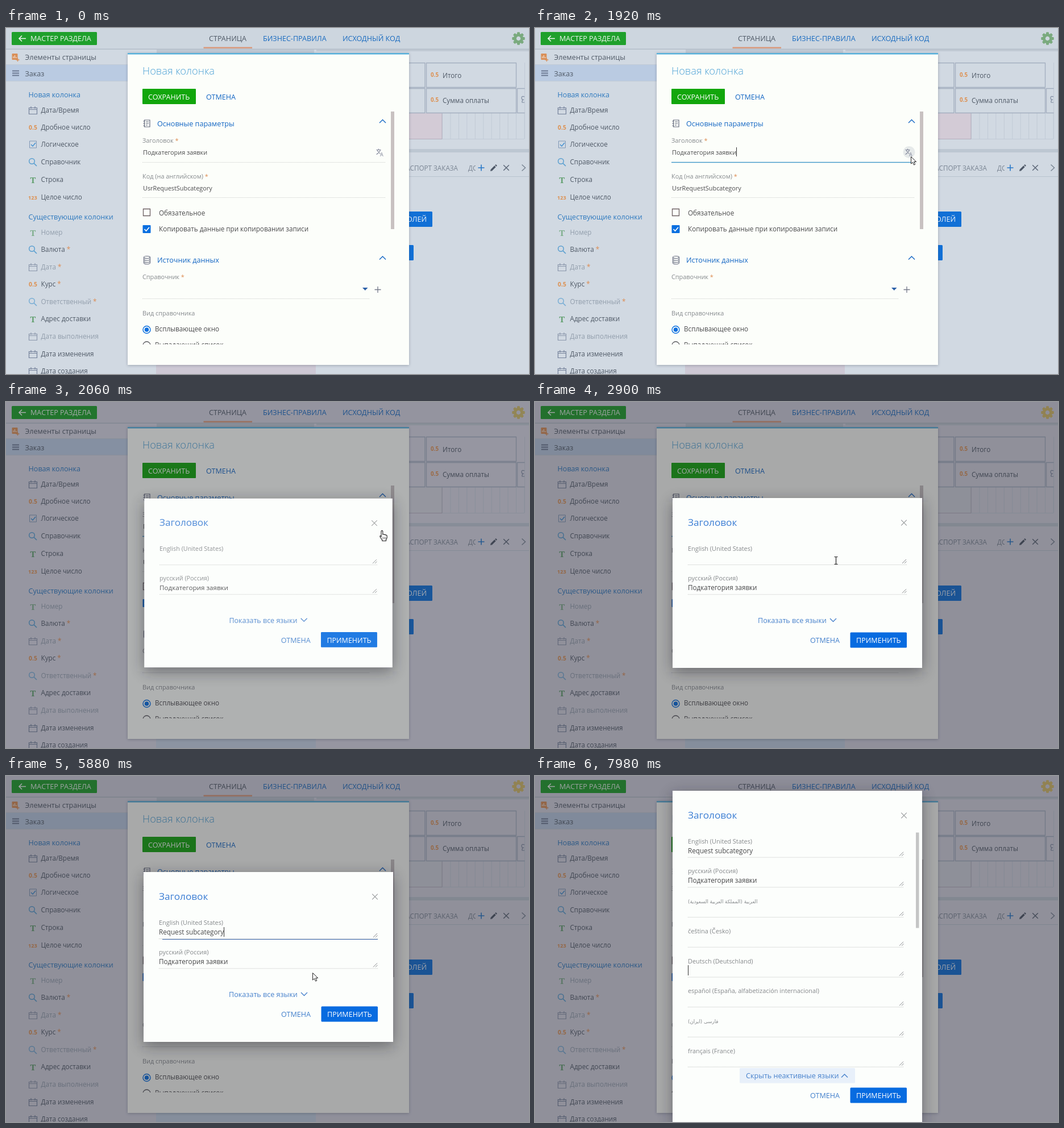
Animation, 920 px wide and 609 px high, one loop 8000 ms. Source, as an HTML page:

```html
<!DOCTYPE html>
<html lang="ru">
<head>
<meta charset="utf-8">
<title>Новая колонка</title>
<style>
html, body { margin: 0; width: 100%; height: 100%; overflow: hidden; background: #d0d8e1; }
svg { display: block; width: 920px; height: 609px; font-family: "Open Sans", "Noto Sans", sans-serif; }
text { white-space: pre; }
</style>
</head>
<body>
<svg id="stage" viewBox="0 0 920 609" xmlns="http://www.w3.org/2000/svg"></svg>
<script>
const LOOP = 8000;
const S = 10.88, M = 11.7, L = 12.6; // type sizes

const rect = (x, y, w, h, fill, more = '') =>
  `<rect x="${x}" y="${y}" width="${w}" height="${h}" fill="${fill}" ${more}/>`;
const line = (d, color, w = 1, more = '') =>
  `<path d="${d}" fill="none" stroke="${color}" stroke-width="${w}" ${more}/>`;
const text = (x, y, size, str, fill, more = '') =>
  `<text x="${x}" y="${y}" font-size="${size}" fill="${fill}" ${more}>${str}</text>`;
const star = '<tspan fill="#dd8c52"> *</tspan>';
const dots = 'stroke-dasharray="1 1"';
const chevron = (x, y, color, up) =>
  line(up ? `M${x - 5.5} ${y + 3}l5.5 -5.5 5.5 5.5` : `M${x - 5.5} ${y - 3}l5.5 5.5 5.5 -5.5`, color, 1.4);
const cross = (x, y, r, color, w) =>
  line(`M${x - r} ${y - r}l${2 * r} ${2 * r}M${x + r} ${y - r}l${-2 * r} ${2 * r}`, color, w);
const plus = (x, y, r, color, w) =>
  line(`M${x - r} ${y}h${2 * r}M${x} ${y - r}v${2 * r}`, color, w);

const icons = {
  date: y => line(`M40.5 ${y - 4.5}h14v11h-14zM40.5 ${y - 1.5}h14M44 ${y - 7}v4M51 ${y - 7}v4`, '#74819a', 1.2),
  num: y => text(40, y + 4, 10.4, '0.5', '#dd9050', 'font-weight="700"'),
  bool: y => line(`M41.5 ${y - 6}h12v12h-12z`, '#7f97b5') + line(`M44 ${y}l3 3 5 -6`, '#3f8fd0', 1.4),
  ref: y => `<circle cx="45.5" cy="${y - 1.5}" r="4.8" fill="none" stroke="#5a9fd0" stroke-width="1.5"/>` +
    line(`M49 ${y + 2}l5 5`, '#5a9fd0', 1.7),
  str: y => text(47.5, y + 5.5, 15, 'T', '#63a070', 'text-anchor="middle" font-weight="600" style="font-family:\'Noto Serif\',serif"'),
  int: y => text(39, y + 3.5, 9.2, '123', '#dd9050', 'font-weight="700"')
};

const fields = [
  [145, 'date', 'Дата/Время'], [175, 'num', 'Дробное число'], [205, 'bool', 'Логическое'],
  [236, 'ref', 'Справочник'], [267, 'str', 'Строка'], [298, 'int', 'Целое число'],
  [360, 'str', 'Номер', 0, 1], [390, 'ref', 'Валюта', 1], [421, 'date', 'Дата', 1, 1],
  [451, 'num', 'Курс', 1], [482, 'ref', 'Ответственный', 1, 1], [512, 'str', 'Адрес доставки'],
  [543, 'date', 'Дата выполнения', 0, 1], [574, 'date', 'Дата изменения'], [604, 'date', 'Дата создания']
];

function gear() {
  let teeth = '';
  for (let i = 0; i < 8; i++) teeth += `<rect x="-2.4" y="-11.2" width="4.8" height="5" rx="1" transform="rotate(${i * 45})" stroke="none"/>`;
  return `<g id="gear" transform="translate(901.5 18.5)">${teeth}<circle r="6.2" fill="none" stroke-width="5"/></g>`;
}

function page() {
  const ink = '#505a67', blue = '#1b6cc0', edge = '#a3aebf';
  let s = rect(0, 0, 920, 609, '#d1d9e2', 'id="ground"') + rect(0, 0, 920, 37, '#cdd6df', 'id="header"') +
    rect(0, 36.5, 920, 1.5, '#b4bec9') +
    rect(265, 38, 277, 6, '#bfc8d3') + rect(546, 38, 374, 3, '#c0c9d3') +
    rect(264, 44, 281, 565, '#cdc8d4', 'id="canvas"') +
    rect(10, 7, 150, 23, '#1fa02c', 'rx="1.5"') +
    line('M35 18.5H23.5M28 13.5l-5 5 5 5', '#eef6f0', 1.6) +
    text(43, 23, L, 'МАСТЕР РАЗДЕЛА', '#eef6f0') +
    text(357, 23, L, 'СТРАНИЦА', ink) + text(452, 23, L, 'БИЗНЕС-ПРАВИЛА', blue) +
    text(592, 23, L, 'ИСХОДНЫЙ КОД', blue) + rect(347.5, 33.5, 85.5, 2.5, '#d99a7c') + gear();

  s += rect(0, 65, 264, 28.5, '#bacbe2') + line('M0 64.5H264M0 93.5H264', '#c0cad6') +
    rect(10.5, 45, 10, 11, '#d98f58', 'rx="1"') +
    line('M13 53v-3M15.5 53v-5M18 53v-2', '#f0e4da', 1.2) + plus(20.5, 56, 3, '#d98f58', 1.4) +
    line('M11 75.5h12M11 79.5h12M11 83.5h12', '#6d7b93', 2.2) +
    text(33.5, 56, L, 'Элементы страницы', ink) + text(33.5, 84.5, L, 'Заказ', ink) +
    text(39.5, 122, L, 'Новая колонка', '#2f7abf') + text(39.5, 337, L, 'Существующие колонки', '#2f7abf');
  for (const [y, icon, label, must, off] of fields) {
    s += `<g${off ? ' opacity=".75"' : ''}>${icons[icon](y)}</g>` +
      text(61.5, y + 4.3, M, label + (must ? star : ''), off ? '#929eac' : ink);
  }

  let grid = '';
  for (let i = 0; i < 11; i++) grid += `M${767.5 + i * 14.45} 150v45`;
  s += line(grid, '#c1cad6') + line('M767 195.5H912M912.5 61v134', '#c1cad6') +
    rect(700, 150, 67, 45, '#d3cbd6', 'id="slot"') + line('M700 195.5h67v-45', '#b3aebd') +
    line('M700 61.5h37v43h-37M739.5 61.5h158v43h-158zM700 106.5h37v43h-37M739.5 106.5h158v43h-158zM912.5 106.5h-13v43h13', edge, 1.3) +
    text(747, 85.5, 9.8, '0.5', '#dd9050', 'font-weight="700"') + text(768, 88, M, 'Итого', ink) +
    text(747, 129.5, 9.8, '0.5', '#dd9050', 'font-weight="700"') + text(768, 132, M, 'Сумма оплаты', ink) +
    line('M912 121q-5 -2 -5 2t4 3q-4 1 -3 5h4', '#7f8ba0', 1.2) +
    rect(546, 213, 374, 6, '#bdc7d2') + line('M546 261.5H920', '#b9c3cf') +
    text(795, 250.5, M, 'ПАСПОРТ ЗАКАЗА', '#7b8694', 'text-anchor="end"') +
    text(813, 250.5, M, 'ДС', '#7b8694', 'clip-path="url(#tabClip)"') +
    plus(836, 246, 5.5, '#2878c8', 1.6) + cross(880, 246, 4.8, '#5d6878', 1.5) +
    line('M854 250l6.5 -6.5', '#4c5665', 3.2) + line('M861.3 242.7l1.5 -1.5', '#4c5665', 3.2) +
    `<path d="M852 252l.8 -3.5 2.7 2.7z" fill="#4c5665"/>` +
    line('M907.5 240.5l6 5.5 -6 5.5', '#7b8694', 1.5) +
    rect(640, 323, 110, 27, '#1170d6', 'rx="1.5"') +
    text(740, 341, L, 'ПОЛЕЙ', '#eef3f9', 'text-anchor="end"') + rect(640, 382, 77, 27, '#1170d6', 'rx="1.5"');
  return s;
}

function modal() {
  const blue = '#1467c4', ink = '#4c4c4e', soft = '#868a8e';
  return rect(214, 45, 495, 549, '#3a4252', 'opacity=".35" filter="url(#soft)"') +
    rect(214, 44, 495, 549, '#fcfefa') + rect(214, 44, 495, 2.5, '#58b0da') +
    text(240, 82, 18.3, 'Новая колонка', '#4fa3d6', 'font-weight="300"') +
    rect(240, 107, 94, 27, '#12a60c', 'rx="1"') + text(250, 126, L, 'СОХРАНИТЬ', '#fff') +
    text(352, 126, L, 'ОТМЕНА', blue) +
    line('M243.5 162h9.5v12h-9.5zM241.5 164h3M241.5 168h3M241.5 172h3M246 165h5M246 168h5M246 171h3', '#62687c', 1.2) +
    text(266, 172.5, L, 'Основные параметры', blue) + chevron(662.5, 164, blue, true) +
    text(240, 201.5, S, 'Заголовок' + star, soft) + text(241, 222.5, S, 'Подкатегория заявки', ink) +
    '<circle id="hover" cx="658" cy="218.5" r="10.5" fill="#e6eaea"/>' +
    line('M651.5 214.5h8M655.5 212.5v2M658.5 214.5q-1.5 5 -7 8M653 215q2 4.5 5.5 6.5', '#82879a', 1.1) +
    text(658, 225.5, 9, 'A', '#82879a') +
    line('M240 236.5H668M240 298.5H668', '#cbcdcb', 1, dots) +
    `<g id="focus1">${rect(240, 235.8, 428, 1.4, '#3f97c8')}${rect(354, 210, 1, 16, '#333')}</g>` +
    text(240, 264.5, S, 'Код (на английском)' + star, soft) + text(241, 285.5, S, 'UsrRequestSubcategory', ink) +
    line('M241.5 318.5h12v12h-12z', '#6d6064', 1.3) + text(269, 329.5, M, 'Обязательное', ink) +
    rect(240.5, 347, 14, 14, '#0a6fe0', 'rx="1"') + line('M243.5 354l3 3.2 5.5 -6.5', '#fff', 1.6) +
    text(269, 358.3, M, 'Копировать данные при копировании записи', ink) +
    line('M242.5 403.5a5.5 2 0 0 0 11 0a5.5 2 0 0 0 -11 0v10a5.5 2 0 0 0 11 0v-10M242.5 407a5.5 2 0 0 0 11 0M242.5 410.5a5.5 2 0 0 0 11 0', '#62687c', 1.1) +
    text(266, 413, L, 'Источник данных', blue) + chevron(662.5, 404.5, blue, true) +
    text(240, 441.5, S, 'Справочник' + star, soft) + line('M240 476.5H640', '#cbcdcb', 1, dots) +
    '<path d="M627 457h9.5l-4.75 5z" fill="#2b60a8"/>' + plus(654, 460.5, 5.5, '#74798a', 1.3) +
    text(240, 506, S, 'Вид справочника', soft) +
    '<circle cx="247.5" cy="531" r="6.5" fill="none" stroke="#0a6fe0" stroke-width="1.4"/><circle cx="247.5" cy="531" r="3.8" fill="#0a6fe0"/>' +
    text(262, 534.3, M, 'Всплывающее окно', ink) +
    `<g clip-path="url(#bodyClip)"><circle cx="247.5" cy="558.5" r="6.5" fill="none" stroke="#5b5b60" stroke-width="1.3"/>` +
    text(262, 562, M, 'Выпадающий список', ink) + '</g>' +
    rect(677, 147, 6, 207, '#c8c1c1');
}

// One language field; y is the label baseline
function row(y, label, value, right, rtl) {
  return text(269, y, rtl ? 8.7 : S, label, '#85888b', rtl ? 'style="font-family:\'DejaVu Sans\',sans-serif"' : '') +
    text(269, y + 17, M, value, '#48484a') +
    line(`M269 ${y + 24.5}H${right}`, '#c2c4c2', 1, dots) +
    line(`M${right - 8} ${y + 22}l7 -7M${right - 4} ${y + 22}l3.5 -3.5`, '#85888b', 1);
}

function frame(dy, button) {
  return rect(242, 169 - dy, 439, 299 + 2 * dy, '#1c1e28', 'opacity=".45" filter="url(#deep)" transform="translate(0 7)"') +
    rect(242, 169 - dy, 439, 299 + 2 * dy, '#fcfefc') +
    `<g class="ink">` + text(269, 217.5 - dy, 17.2, 'Заголовок', '#3a7dd4') +
    cross(649, 212.5 - dy, 4.8, '#96999a', 1.1) +
    button +
    text(484, 424.3 + dy, L, 'ОТМЕНА', '#4380cc') +
    rect(554.5, 405.5 + dy, 99.5, 27, '#076be0', 'rx="1.5"') +
    text(565, 424.3 + dy, L, 'ПРИМЕНИТЬ', '#fff') + '</g>';
}

function smallDialog() {
  return frame(0, rect(383, 371, 159, 26.5, '#e8f0fa', 'id="linkHover" rx="1.5"') +
    text(392, 389, L, 'Показать все языки', '#4882cc') + chevron(524.5, 384, '#4882cc', false)) +
    '<g class="ink">' + row(262, 'English (United States)', '<tspan id="typed"></tspan>', 654) +
    row(314.3, 'русский (Россия)', 'Подкатегория заявки', 654) + '</g>' +
    rect(275, 287, 379, 1, '#3c68ac', 'id="focus2"') + rect(269, 266, 1, 17, '#333', 'id="caret2"');
}

function bigDialog() {
  const langs = ['English (United States)', 'русский (Россия)', 'العربية (المملكة العربية السعودية)', 'čeština (Česko)',
    'Deutsch (Deutschland)', 'español (España, alfabetización internacional)', 'فارسى (ايران)', 'français (France)'];
  const values = ['Request subcategory', 'Подкатегория заявки'];
  return frame(143, rect(360, 514, 203, 26.5, '#e8f0fa', 'rx="1.5"') +
    text(371, 532, L, 'Скрыть неактивные языки', '#4882cc') + chevron(544.5, 527.5, '#4882cc', true)) +
    langs.map((name, i) => row(118.7 + i * 52.7, name, values[i] || '', 649, i === 2 || i === 6)).join('') +
    rect(670, 99.5, 5.5, 168, '#c4c5c5') + rect(269, 333, 1, 18, '#333', 'id="caret3"');
}

const pointers = {
  arrow: '<path d="M.5 .5v12.5l3 -2.7 2 4.7 2.2 -1 -2 -4.5h4z" fill="#fff" stroke="#222" stroke-width="1"/>',
  hand: '<path d="M-1 11V1.8a1.4 1.4 0 0 1 2.8 0V7q1.5 -.8 2.6 .6 1.5 -.7 2.5 .6 2.3 -.4 2.3 2V13l-1.7 3.5V18.5H.8V17l-3.6 -5.3q-1 -2 .5 -2.2z" fill="#fff" stroke="#222" stroke-width="1.1"/>' +
    line('M2 11.5v4M4.4 11.5v4M6.7 11.5v4', '#444', .8),
  beam: line('M-3 -6.5h2.2q.8 0 .8 1v11q0 1 -.8 1H-3M3 -6.5H.8q-.8 0 -.8 1v11q0 1 .8 1H3', '#222', 1.2)
};

document.getElementById('stage').innerHTML =
  `<defs><filter id="soft" x="-10%" y="-10%" width="120%" height="120%"><feGaussianBlur stdDeviation="2.5"/></filter>
  <filter id="deep" x="-20%" y="-30%" width="140%" height="160%"><feGaussianBlur stdDeviation="13"/></filter>
  <clipPath id="bodyClip"><rect x="214" y="540" width="495" height="17"/></clipPath>
  <clipPath id="tabClip"><rect x="800" y="230" width="26" height="30"/></clipPath></defs>` +
  page() + modal() + rect(0, 0, 920, 609, '#282830', 'id="dim"') +
  `<g id="dialog"><g id="small">${smallDialog()}</g><g id="big">${bigDialog()}</g></g>` +
  Object.keys(pointers).map(k => `<g id="${k}">${pointers[k]}</g>`).join('');

const el = id => document.getElementById(id);
const put = (id, name, value) => el(id).setAttribute(name, value);
const show = (id, on) => put(id, 'display', on ? 'inline' : 'none');
const clamp = v => Math.max(0, Math.min(1, v));
const span = (t, a, b) => clamp((t - a) / (b - a));
const ease = p => p * p * (3 - 2 * p);
const lerp = (a, b, p) => a + (b - a) * p;
const mix = (a, b, p) => `rgb(${a.map((v, i) => Math.round(lerp(v, b[i], p)))})`;

function pointer(t) {
  if (t < 370 || t >= 7110) return null;
  if (t < 1180) {
    const p = ease(span(t, 340, 1120));
    return ['arrow', lerp(797, 660, p), lerp(612, 250, p)];
  }
  if (t < 2600) {
    const p = ease(span(t, 1150, 1420));
    const hand = (t >= 1300 && t < 1860) || t >= 2060;
    return [hand ? 'hand' : 'arrow', lerp(660, 661, p), lerp(250, 226, p)];
  }
  if (t < 5520) {
    const p = ease(span(t, 2570, 2900));
    return [p > .75 ? 'beam' : 'arrow', lerp(661, 529.5, p), lerp(226, 279, p)];
  }
  const p = ease(span(t, 5490, 6180)), y = lerp(279, 391, p);
  return [y < 290 ? 'beam' : y < 371 ? 'arrow' : 'hand', lerp(529.5, 523, p) + 56 * p * (1 - p), y];
}

function draw(t) {
  // The dialog opens in coarse steps
  const q = t < 1920 ? t : 1920 + Math.floor((t - 1920) / 70) * 70;
  const dim = span(q, 1920, 2075);
  const gearColor = mix([122, 170, 126], [215, 190, 105], dim);
  put('dim', 'opacity', .4 * dim);
  put('gear', 'fill', gearColor);
  put('gear', 'stroke', gearColor);
  put('ground', 'fill', mix([209, 217, 226], [212, 212, 225], dim));
  put('header', 'fill', mix([205, 214, 223], [209, 209, 222], dim));
  put('slot', 'fill', mix([211, 203, 214], [210, 213, 222], dim));
  put('canvas', 'fill', mix([205, 200, 212], [195, 210, 228], dim));

  show('hover', t >= 1240 && t < 2060);
  show('focus1', t >= 1860 && t < 3150);

  const scale = .9 + .1 * ease(span(q, 1940, 2080));
  put('dialog', 'opacity', span(q, 1920, 2002));
  put('dialog', 'transform', `translate(461.5 318.5) scale(${scale}) translate(-461.5 -318.5)`);
  const ink = lerp(.7, 1, span(q, 1990, 2100));
  for (const g of document.querySelectorAll('#small .ink')) g.setAttribute('opacity', ink);

  const open = t >= 7110;
  show('small', !open);
  show('big', open);
  const pasted = t >= 4650, focused = t >= 3150 && t < 6860;
  el('typed').textContent = pasted ? 'Request subcategory' : '';
  show('focus2', focused);
  put('focus2', 'opacity', span(t, 3090, 3420));
  show('caret2', focused);
  put('caret2', 'x', pasted ? 383 : 269);
  show('caret3', t >= 7980);

  const at = pointer(t);
  show('linkHover', at && t > 5520 && at[2] >= 371);
  for (const k in pointers) show(k, at && at[0] === k);
  if (at) put(at[0], 'transform', `translate(${at[1].toFixed(2)} ${at[2].toFixed(2)})`);
}

const start = performance.now();
function tick() {
  draw((performance.now() - start) % LOOP);
  requestAnimationFrame(tick);
}
tick();
</script>
</body>
</html>
```
